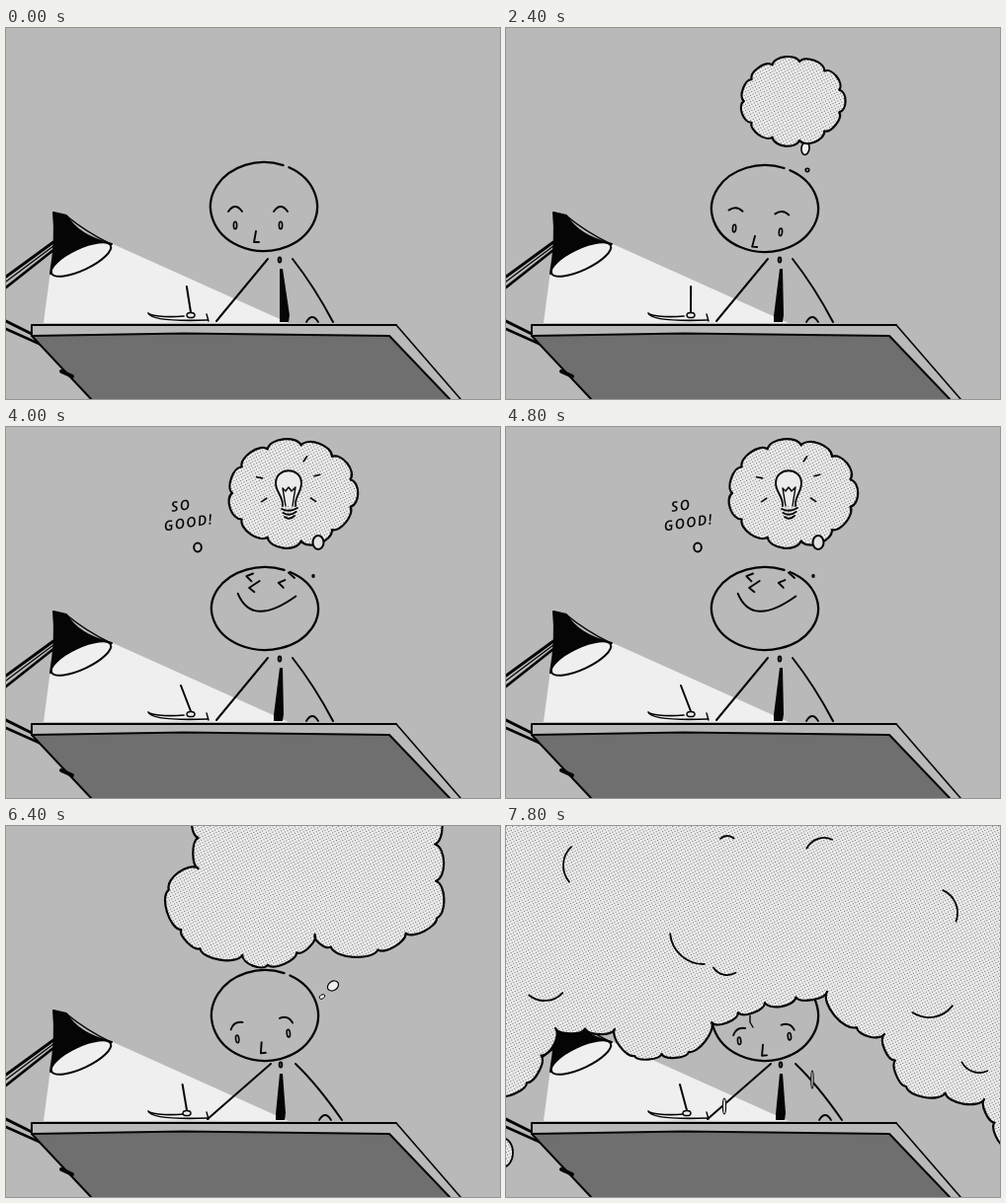
An HTML page with a canvas for the animation above (8 s loop, 500x376 px).

```html
<!DOCTYPE html>
<html>
<head>
<meta charset="utf-8">
<style>
html, body { margin: 0; width: 100%; height: 100%; overflow: hidden; background: #b9b9b9; }
canvas { display: block; }
</style>
</head>
<body>
<canvas id="stage" width="500" height="376"></canvas>
<script>
const ctx = document.getElementById('stage').getContext('2d');
const INK = '#050505', WALL = '#b9b9b9', PAPER = '#efefef', FRONT = '#6f6f6f';
const STEP = 200, STEPS = 40;

// Step numbers at which the story moves on.
const PUFF = 7, SWELL = 10, IDEA = 13, WORDS = 18, BURST = 25, MASS = 31, STORM = 37;

const tone = makeTone();

function makeTone() {
  const tile = document.createElement('canvas');
  tile.width = tile.height = 4;
  const g = tile.getContext('2d');
  g.fillStyle = '#ebebeb';
  g.fillRect(0, 0, 4, 4);
  g.fillStyle = '#686868';
  g.fillRect(0, 0, 1, 1);
  g.fillRect(2, 2, 1, 1);
  const pattern = ctx.createPattern(tile, 'repeat');
  pattern.setTransform(new DOMMatrix().rotate(18));
  return pattern;
}

const lerp = (a, b, t) => a + (b - a) * t;

function seeded(seed) {
  return () => (seed = seed * 16807 % 2147483647) / 2147483647;
}

function ink(width) {
  ctx.lineWidth = width;
  ctx.strokeStyle = INK;
  ctx.stroke();
}

function line(points, width = 2) {
  ctx.beginPath();
  points.forEach(p => ctx.lineTo(...p));
  ink(width);
}

function bow(x, y, cx, cy, u, v, width = 2) {
  ctx.beginPath();
  ctx.moveTo(x, y);
  ctx.quadraticCurveTo(cx, cy, u, v);
  ink(width);
}

function shape(points, fill) {
  ctx.beginPath();
  points.forEach(p => ctx.lineTo(...p));
  ctx.closePath();
  ctx.fillStyle = fill;
  ctx.fill();
}

function oval(x, y, rx, ry, fill, tilt = 0, width = 1.6) {
  ctx.beginPath();
  ctx.ellipse(x, y, rx, ry, tilt, 0, Math.PI * 2);
  ctx.fillStyle = fill;
  ctx.fill();
  ink(width);
}

// Splits each edge of a clockwise outline into bumps of about the given size.
function cloud(keys, size, bulge) {
  const rand = seeded(5);
  ctx.beginPath();
  ctx.moveTo(...keys[0]);
  keys.forEach(([x, y], i) => {
    const [u, v] = keys[(i + 1) % keys.length];
    const count = Math.max(1, Math.round(Math.hypot(u - x, v - y) / size));
    const dx = (u - x) / count, dy = (v - y) / count;
    for (let n = 0; n < count; n++) {
      const depth = bulge * lerp(.85, 1.15, rand());
      const px = x + dx * n + dy * depth, py = y + dy * n - dx * depth;
      ctx.bezierCurveTo(px + dx * .1, py + dy * .1, px + dx * .9, py + dy * .9,
        x + dx * (n + 1), y + dy * (n + 1));
    }
  });
  ctx.closePath();
  ctx.fillStyle = tone;
  ctx.fill();
  ink(2.2);
}

function bubble(cx, cy, rx, ry, lobes, bulge) {
  const keys = Array.from({ length: lobes }, (_, i) => {
    const a = (i + .5) / lobes * Math.PI * 2;
    return [cx + rx * Math.cos(a), cy + ry * Math.sin(a)];
  });
  cloud(keys, 99, bulge);
}

function fold(x, y, r, middle) {
  ctx.beginPath();
  ctx.arc(x, y, r, middle - .75, middle + .75);
  ink(1.8);
}

function drawRoom() {
  ctx.fillStyle = WALL;
  ctx.fillRect(0, 0, 500, 376);
  shape([[45, 246], [106, 218], [286, 299], [38, 299]], PAPER);
  for (const [from, to, w] of [[217, 252, 3], [221, 257, 1.3], [225, 263, 2.6]]) line([[48, from], [0, to]], w);
  line([[0, 297], [32, 313]], 3);
  line([[0, 305], [38, 322]], 2.6);

  ctx.beginPath();
  ctx.moveTo(48, 187);
  ctx.lineTo(61, 190);
  ctx.quadraticCurveTo(73, 211, 107, 219);
  ctx.lineTo(45, 249);
  ctx.quadraticCurveTo(51, 215, 48, 187);
  ctx.fillStyle = INK;
  ctx.fill();
  ink(2);
  bow(62, 191, 80, 206, 106, 219, 1.6);
  oval(76, 234.5, 33, 11, PAPER, -.44, 2);
}

function drawDesk() {
  shape([[26, 301], [180, 298.5], [395, 301], [460, 376], [388, 376], [26, 313]], WALL);
  shape([[26, 312], [180, 309.5], [388, 312], [449, 376], [86, 376]], FRONT);
  line([[395, 301], [26, 301], [26, 312], [86, 376]]);
  line([[395, 301], [460, 376]], 1.6);
  line([[26, 312], [180, 309.5], [388, 312], [449, 376]]);
  line([[56, 348], [67, 353]], 4);
}

function drawPaper(k, low) {
  const x = low ? 183 : 187, writing = k < IDEA || k >= BURST;
  const top = writing ? 185 + (low ? 9 : 3) * Math.cos((k - 35) * Math.PI / 4) : 177;
  shape([[145, 290], [157, 293], [203, 291], [204, 297], [150, 297]], PAPER);
  bow(144, 289, 148, 298, 204, 296, 1.7);
  bow(145, 290, 158, 294, 180, 292, 1.7);
  line([[203, 290], [205, 297]], 1.4);
  line([[top, 262], [x, 288]]);
  oval(x, 291, 4, 2.6, PAPER, 0, 1.5);
}

function drawBody(low, tip) {
  const y = low ? 241 : 234, dx = low ? 3 : 0, reach = low ? 9 : 0;
  line([[265 + dx, y], [213 - reach, 297]]);
  bow(290 + dx, y, 312 + dx, 262, 331 + reach, 298);
  const hand = low ? 323 : 310;
  bow(hand - 6, 298, hand, 288, hand + 6, 298, 1.8);
  oval(277 + dx / 3, y + 1, 1.5, 2.6, '#555');
  shape([[277, y + 10], [280, y + 10], [tip + 5, 291], [tip + 4, 298], [tip - 5, 298], [tip - 5, 292]], INK);
}

// x, y: point between the eyes; gap: eye distance; lift, arch, tilt: brows.
const FACES = {
  work: { x: 255, y: 200, gap: 46, roll: 0, lift: 16, arch: 5, tilt: 0, hy: 181, ry: 45 },
  think: { x: 254.5, y: 205, gap: 47, roll: .08, lift: 20, arch: 3, tilt: 0, hy: 183, ry: 44 },
  smile: { x: 254, y: 169, gap: 36, roll: .03, lift: 15, arch: 4, tilt: 0, hy: 184, ry: 42 },
  glad: { x: 262, y: 155, gap: 31, roll: .2, hy: 184, ry: 42 },
  sad: { x: 257, y: 200, gap: 48, roll: -.04, lift: 19, arch: 3, tilt: .4, hy: 181, ry: 45 },
  worry: { x: 260, y: 213, gap: 52, roll: -.11, lift: 15, arch: 3, tilt: .45, hy: 192, ry: 46 },
  alarm: { x: 261.5, y: 215.5, gap: 51, roll: -.09, lift: 11, arch: 3, tilt: .45, hy: 192, ry: 46 }
};

function mood(k) {
  if (k < PUFF) return 'work';
  if (k < IDEA) return 'think';
  if (k < WORDS) return 'smile';
  if (k < BURST) return 'glad';
  if (k < MASS) return 'sad';
  return k < STORM ? 'worry' : 'alarm';
}

function drawEye(face, side) {
  const x = side * face.gap / 2;
  oval(x, 0, 1.7, 3.8, '#999', 0, 1.5);
  ctx.save();
  ctx.translate(x, -face.lift);
  ctx.rotate(side * face.tilt);
  bow(-7, 2, 0, 2 - face.arch * 2, 7, 2, 1.9);
  ctx.restore();
}

function drawHead(name) {
  const face = FACES[name];
  ctx.beginPath();
  ctx.ellipse(name === 'work' || name === 'sad' ? 261 : 262, face.hy, 54, face.ry, 0, -1.08, Math.PI * 2 - 1.2);
  ink(2.3);
  ctx.save();
  ctx.translate(face.x, face.y);
  ctx.rotate(face.roll);
  if (name === 'glad') {
    for (const x of [-18, 15]) line([[x + 5, -4], [x - 1, 0], [x + 5, 4]], 1.9);
    line([[-5, 2], [-14, 11], [-8, 14]], 1.9);
    line([[22, -12], [29, -8]], 1.9);
    bow(-24, 19, -3, 50, 34, 10);
  } else {
    drawEye(face, -1);
    drawEye(face, 1);
    line([[-2, 6], [-4, 17], [1, 17]], 1.9);
  }
  if (name === 'smile') {
    ctx.beginPath();
    ctx.moveTo(-10, 24);
    ctx.quadraticCurveTo(4, 29, 16, 22);
    ctx.quadraticCurveTo(3, 40, -10, 24);
    ctx.fillStyle = INK;
    ctx.fill();
    ink(1.4);
  }
  ctx.restore();
}

function drawSweat() {
  oval(310, 257, 1.2, 9, '#d8d8d8', 0, 1.1);
  oval(221, 284, 1.6, 8, '#d8d8d8', 0, 1.1);
  line([[247, 192], [247, 199], [250, 204]], 1.4);
}

function drawBulb(k) {
  ctx.beginPath();
  ctx.moveTo(280, 80);
  ctx.bezierCurveTo(281, 71, 273, 66, 273, 57);
  ctx.bezierCurveTo(273, 40, 299, 40, 299, 57);
  ctx.bezierCurveTo(299, 66, 292, 71, 293, 80);
  ctx.fillStyle = '#ebebeb';
  ctx.fill();
  ink(1.9);
  line([[283, 80], [280, 62], [283, 65], [286, 61], [289, 65], [293, 61], [290, 80]], 1.4);
  for (let i = 0; i < 3; i++) bow(279 + i * 1.5, 83 + i * 4, 287, 87 + i * 4, 295 - i * 1.5, 82 + i * 4, 1.8);
  const length = k < BURST ? 6 : 3;
  for (const a of [-2.95, -.97, -.27, .59, 2.54]) {
    const at = r => [286 + r * Math.cos(a), 57 + r * Math.sin(a)];
    line([at(27), at(27 + length)], 1.6);
  }
}

const MASS_KEYS = [[130, 14], [130, -90], [530, -90], [535, 98], [482, 124], [435, 152], [355, 147], [328, 126],
  [297, 157], [248, 178], [205, 161], [133, 150], [101, 118], [80, 50]];
const MASS_FOLDS = [[171, 58, 28, 3.8], [283, 42, 18, -1.4], [392, 36, 24, .15], [381, 86, 21, 1.4], [246, 128, 29, 2.2]];
const STORM_KEYS = [[-60, -60], [560, -60], [560, 335], [505, 324], [484, 277], [405, 264], [383, 211], [355, 204], [325, 168],
  [262, 179], [208, 199], [185, 229], [130, 233], [110, 206], [50, 205], [21, 260], [-30, 285]];
const STORM_FOLDS = [[84, 40, 26, 3.2], [322, 32, 20, -1.9], [432, 88, 25, -.4], [200, 106, 34, 2.3], [224, 134, 17, 1.8],
  [39, 152, 25, 1.5], [428, 164, 30, 1.4], [224, 20, 10, -1.6], [479, 230, 20, 1.9]];

function drawMass(k) {
  const s = lerp(.42, 1, ((k - MASS + 1) / 5) ** 1.3), sy = Math.min(s, 1);
  const move = (x, y) => [290 + (x - 290) * s, 86 + (y - 86) * sy];
  cloud(MASS_KEYS.map(p => move(...p)), 36, .27);
  if (k > MASS + 1) MASS_FOLDS.forEach(([x, y, r, a]) => fold(...move(x, y), r * s, a));
  oval(331, 162, 6, 4.5, PAPER, -.6, 1.2);
  oval(320, 173, 3, 2, PAPER, -.6, 1);
}

function drawStorm(k) {
  const back = STEPS - 1 - k, s = 1 - .06 * back;
  const move = (x, y) => [265 + (x - 265) * s, y - 15 * back];
  cloud(STORM_KEYS.map(p => move(...p)), 34, .25);
  STORM_FOLDS.forEach(([x, y, r, a]) => fold(...move(x, y), r, a));
  if (!back) oval(-4, 331, 11, 15, tone, 0, 1.8);
}

function drawThought(k) {
  if (k >= PUFF - 2 && k < IDEA) oval(305, 144, 1.8, 1.6, '#ddd');
  if (k >= PUFF - 1 && k < IDEA) oval(303, 122, 4, 6.5, PAPER, .1);
  if (k < PUFF) return;
  if (k >= STORM) return drawStorm(k);
  if (k >= MASS) return drawMass(k);
  if (k < SWELL) {
    const r = lerp(8, 10, k - PUFF);
    return bubble(290, 95, r, r, 4, .52);
  }
  const grow = Math.min(1, (k - SWELL + 1) / 4), spread = Math.max(0, (k - BURST + 1) / 6);
  bubble(290, lerp(95, 67, grow), lerp(14, 61, grow) + 29 * spread, lerp(14, 49, grow) + 8 * spread, 11, .33);
  if (k < IDEA) return;
  drawBulb(k);
  if (k < BURST) oval(316, 117, 5.5, 7, '#e2e2e2', 0, 2);
  else oval(315, 139, 1.6, 3.5, '#ddd');
  oval(k < BURST ? 311 : 314, k < BURST ? 151 : 155, 1, 1.2, INK);
}

function drawWords(k) {
  if (k < WORDS - 1 || k >= BURST) return;
  oval(194, 122, 3.8, 4.4, '#c4c4c4', 0, 2);
  if (k < WORDS) return;
  ctx.fillStyle = INK;
  ctx.textAlign = 'center';
  ctx.textBaseline = 'middle';
  ctx.font = 'italic 600 14px "Open Sans", sans-serif';
  ctx.letterSpacing = '1.5px';
  ctx.save();
  ctx.translate(185, 98);
  ctx.rotate(-.15);
  ctx.fillText('SO', -5, -18);
  ctx.fillText('GOOD!', 0, 0);
  ctx.restore();
}

function drawSpecks(k) {
  const t = k - BURST + 1;
  if (t < 1 || t > 5) return;
  const rand = seeded(17);
  ctx.fillStyle = INK;
  for (let i = 0; i < 30; i++) {
    const a = rand() * Math.PI * 2, r = Math.sqrt(rand());
    const size = lerp(1, 2.2, rand()) * (1.1 - .13 * t);
    ctx.save();
    ctx.translate(185 - t * 4.5 + Math.cos(a) * r * (22 + t * 5), 93 + Math.sin(a) * r * (19 + t * 4));
    ctx.rotate(a + t);
    ctx.fillRect(-size, -size / 2, size * 2, size);
    ctx.restore();
  }
}

function draw(k) {
  const low = k >= MASS;
  drawRoom();
  drawDesk();
  drawPaper(k, low);
  drawBody(low, low ? 278 : k < SWELL ? 282 : 276);
  drawHead(mood(k));
  if (k > STORM) drawSweat();
  drawThought(k);
  drawWords(k);
  drawSpecks(k);
}

ctx.lineCap = ctx.lineJoin = 'round';
const start = performance.now();

function tick() {
  const t = Math.max(0, performance.now() - start);
  draw(Math.floor(t / STEP) % STEPS);
  requestAnimationFrame(tick);
}
tick();
</script>
</body>
</html>
```
